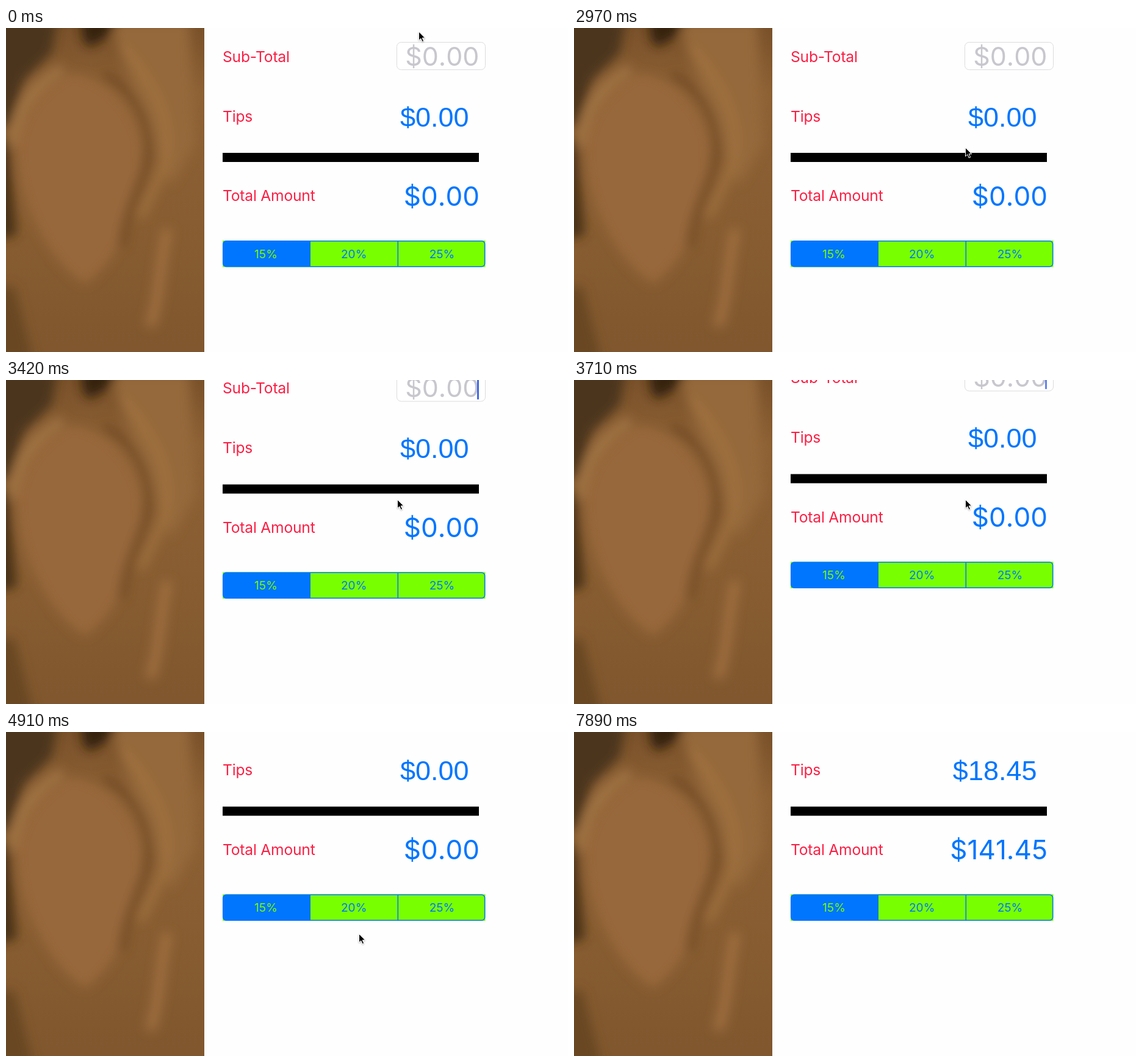
These frames come from a looping animation (921x532 px, 8000 ms). An HTML page:

```html
<!DOCTYPE html>
<html lang="en">
<head>
<meta charset="utf-8">
<title>Tip calculator</title>
<style>
  html, body { margin: 0; width: 100%; height: 100%; overflow: hidden; background: #fefefe; }
  svg { display: block; width: 100vw; height: 100vh; }
  text { font-family: Inter, sans-serif; font-optical-sizing: none; }
  .label { font-size: 24.6px; letter-spacing: -0.2px; fill: #fb1f44; }
  .sum { font-size: 44px; font-kerning: none; fill: #0076ff; text-anchor: end; }
  .tip { font-family: "Liberation Sans", Arial, sans-serif; font-size: 45px; }
  .hint { font-size: 43px; fill: #c7c7cd; }
  .seg { font-size: 19.1px; fill: #0076ff; text-anchor: middle; }
  .on { fill: #78ff00; }
</style>
</head>
<body>
<svg viewBox="0 0 921 532" preserveAspectRatio="none">
  <defs>
    <clipPath id="photo"><rect width="325" height="532"/></clipPath>
    <linearGradient id="fur" x2="0" y2="1">
      <stop offset="0" stop-color="#79512a"/>
      <stop offset=".2" stop-color="#8d6134"/>
      <stop offset=".6" stop-color="#885d31"/>
      <stop offset="1" stop-color="#80572e"/>
    </linearGradient>
    <filter id="soft" x="-50%" y="-50%" width="200%" height="200%"><feGaussianBlur stdDeviation="9"/></filter>
    <filter id="drop" x="-50%" y="-50%" width="200%" height="200%"><feDropShadow dx="0" dy="1" stdDeviation="0.8" flood-opacity=".35"/></filter>
  </defs>

  <g clip-path="url(#photo)">
    <rect width="325" height="532" fill="url(#fur)"/>
    <g filter="url(#soft)">
      <path d="M170 -10H300L310 190L270 260L240 180Z" fill="#95693a"/>
      <path d="M105 75C40 110 10 170 22 240C40 330 90 400 130 420C190 380 225 280 222 190C210 130 160 80 105 75Z" fill="#97683a"/>
      <path d="M-20 -20H85L75 40L30 85L5 160L-20 170Z" fill="#4b341a"/>
      <path d="M-20 180H4L12 280L18 340L-20 350Z" fill="#4a3117"/>
      <path d="M122 -20H190L165 15L138 32L126 20Z" fill="#352210"/>
      <path d="M92 66C45 97 15 132 10 195" fill="none" stroke="#a87a48" stroke-width="12"/>
      <path d="M190 30C235 80 268 140 264 195C258 245 235 275 220 310" fill="none" stroke="#a27241" stroke-width="12"/>
      <path d="M160 75C220 110 240 165 232 215C222 260 195 300 190 360" fill="none" stroke="#6a4521" stroke-width="10"/>
      <path d="M265 330C250 390 255 430 236 490" fill="none" stroke="#a07040" stroke-width="16"/>
      <path d="M-20 425H14L45 545H-20Z" fill="#694722"/>
    </g>
  </g>

  <g id="form">
    <rect x="640.5" y="23.5" width="145" height="45" rx="7" fill="#fff" stroke="#dcdcde"/>
    <text class="sum hint" x="775.5" y="61.5">$0.00</text>
    <rect id="caret" x="772" y="26" width="3" height="39.5" rx="1" fill="#4169e8"/>
    <text class="label" x="355" y="55.7">Sub-Total</text>
    <text class="label" x="355" y="153.7">Tips</text>
    <text class="label" x="355" y="284.2">Total Amount</text>
    <text id="tip" class="sum tip" x="758.5" y="161.7"></text>
    <rect x="355" y="205" width="420" height="15"/>
    <text id="total" class="sum" x="776" y="291.5"></text>
    <rect x="355" y="349" width="430.5" height="43.5" fill="#78ff00"/>
    <path d="M499 349.7H360.7a5 5 0 0 0 -5 5V386.8a5 5 0 0 0 5 5H499Z" fill="#0076ff"/>
    <g fill="none" stroke="#0076ff" stroke-width="1.5">
      <rect x="355.7" y="349.7" width="428.9" height="42.1" rx="5"/>
      <path d="M642.3 349.7V392"/>
    </g>
    <text class="seg on" x="426" y="377.7">15%</text>
    <text class="seg" x="570.2" y="377.7">20%</text>
    <text class="seg" x="714.5" y="377.7">25%</text>
  </g>

  <path id="cursor" filter="url(#drop)" d="M0 0V14.2L3.3 11.2L5.7 16.6L8.1 15.6L5.7 10.3H10.2Z" stroke="#fff" stroke-linejoin="round"/>
</svg>
<script>
const LOOP = 8000;
const TICK = 148.6;   // the screen refreshes once per tick
const TYPED = "123";
const $ = id => document.getElementById(id);
const clamp = v => Math.min(1, Math.max(0, v));
const smooth = u => u * u * (3 - 2 * u);
const money = v => "$" + v.toFixed(2);

// Cursor moves; start and steps are in ticks.
const moves = [
  { start: 0, steps: 4, x: 700.5, y: 44 },
  { start: 10, steps: 3, x: 704, y: 56 },
  { start: 17, steps: 3, x: 641.5, y: 196.5 },
  { start: 32, steps: 1, x: 578.5, y: 331.5 },
  { start: 33, steps: 5, x: 452, y: 536 }
];

function cursorAt(n) {
  let x = 676.5, y = 6;
  for (const m of moves) {
    const p = smooth(clamp((n - m.start) / m.steps));
    x += (m.x - x) * p;
    y += (m.y - y) * p;
  }
  return [x, y];
}

// The caret appears on tick 9 and fades in and out every 7 ticks.
function caretAt(n) {
  return n < 9 ? 0 : clamp(0.5 + 0.75 * Math.cos(2 * Math.PI * (n - 16.75) / 7));
}

// The form rises for 6 ticks, slower in the middle third.
function scrollAt(n) {
  const third = k => clamp((n - 21) / 2 - k);
  return -(33.5 * third(0) + 17 * third(1) + 32 * third(2));
}

function amountAt(n) {
  const keys = [42, 48, 53].filter(k => n >= k).length;
  return Number(TYPED.slice(0, keys));
}

function draw(t) {
  const n = Math.floor(t / TICK + 0.05);
  const amount = amountAt(n);
  $("cursor").setAttribute("transform", `translate(${cursorAt(n)})`);
  $("form").setAttribute("transform", `translate(0 ${scrollAt(n)})`);
  $("caret").setAttribute("opacity", caretAt(n));
  $("tip").textContent = money(amount * 0.15);
  $("total").textContent = money(amount * 1.15);
}

const start = performance.now();
function tick() {
  draw((performance.now() - start) % LOOP);
  requestAnimationFrame(tick);
}
draw(0);
requestAnimationFrame(tick);
</script>
</body>
</html>
```
